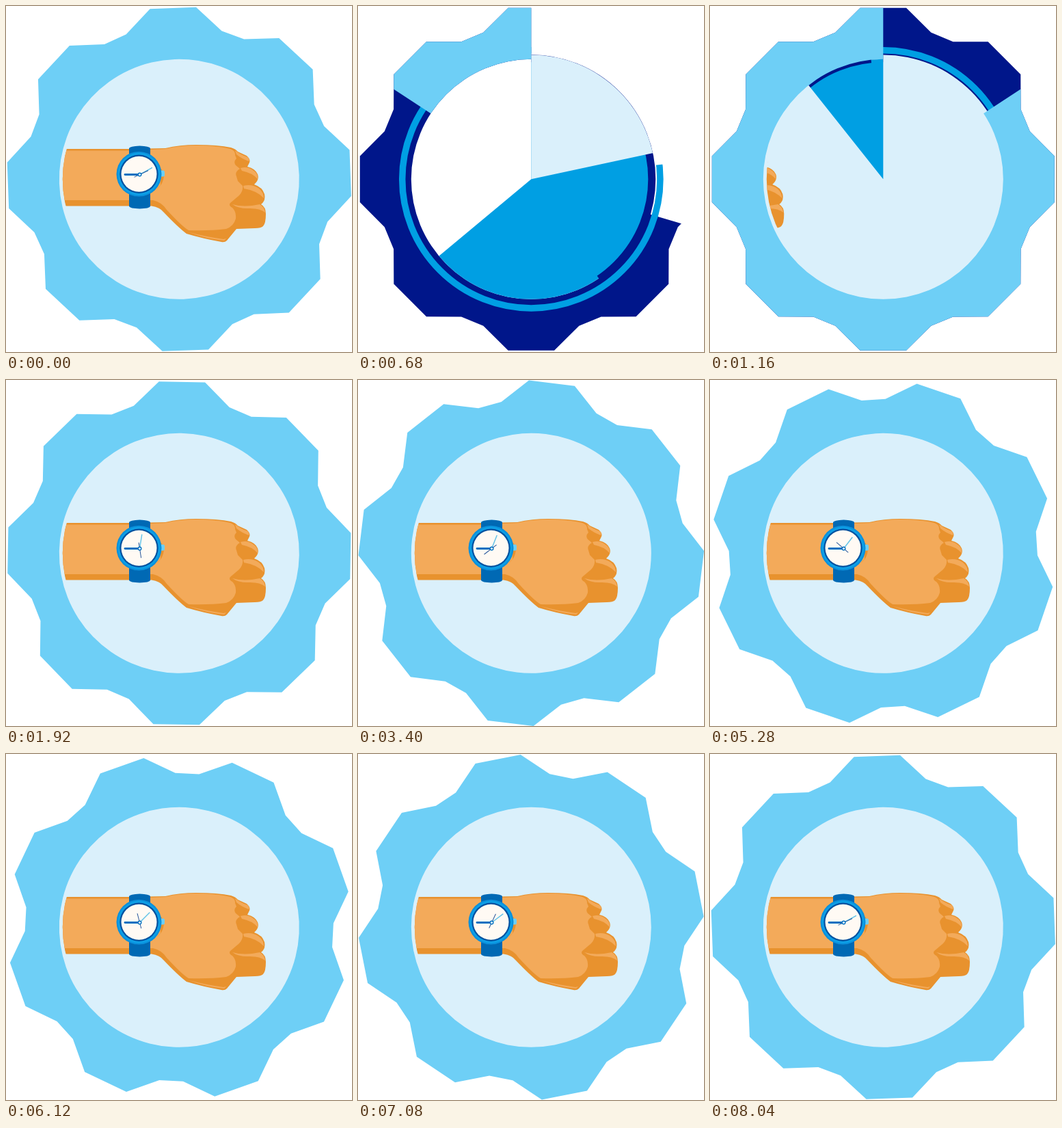
Animation of 506x506 px, one loop 8.08 s. Source, as an HTML page with a canvas:

```html
<!DOCTYPE html>
<html lang="en">
<head>
<meta charset="utf-8">
<title>Watch badge</title>
<style>
html, body { margin: 0; width: 100%; height: 100%; overflow: hidden; background: #fff; }
canvas { display: block; width: 506px; height: 506px; }
</style>
</head>
<body>
<canvas id="stage" width="506" height="506"></canvas>
<script>
const ctx = document.getElementById('stage').getContext('2d');
const LOOP = 8080, STEP = 40, WIPE = 1000, C = 253.3, TAU = Math.PI * 2;
const SKY = '#6ecff6', PALE = '#daf0fb', BLUE = '#009fe3', NAVY = '#00168a';
const SKIN = '#f3aa5a', SHADE = '#e8922e', STRAP = '#0069b4';

const clamp = v => Math.min(1, Math.max(0, v));
const ease = p => (1 - Math.cos(Math.PI * clamp(p))) / 2;
const rad = deg => deg * Math.PI / 180;

function layer(draw) {
  ctx.save();
  draw();
  ctx.restore();
}

function disc(x, y, r, color) {
  ctx.fillStyle = color;
  ctx.beginPath();
  ctx.arc(x, y, r, 0, TAU);
  ctx.fill();
}

function ring(r, width, color) {
  ctx.strokeStyle = color;
  ctx.lineWidth = width;
  ctx.beginPath();
  ctx.arc(0, 0, r, 0, TAU);
  ctx.stroke();
}

function shape(d, color) {
  ctx.fillStyle = color;
  ctx.fill(new Path2D(d));
}

// Radial reveal from twelve o'clock; dir 1 is clockwise, -1 the other way.
function wipe(t, start, dir, draw) {
  const p = ease((t - start) / WIPE);
  if (p <= 0) return;
  layer(() => {
    ctx.translate(C, C);
    if (p < 1) {
      const top = -Math.PI / 2;
      ctx.beginPath();
      ctx.moveTo(0, 0);
      ctx.arc(0, 0, 400, top, top + dir * p * TAU, dir < 0);
      ctx.closePath();
      ctx.clip();
    }
    draw();
  });
}

function gear(color, turn) {
  ctx.rotate(rad(turn));
  ctx.beginPath();
  for (let i = 0; i < 8; i++) {
    const a = i * TAU / 8, c = Math.cos(a), s = Math.sin(a);
    for (const [x, y] of [[-70, -214.5], [-33.7, -250.5], [33.7, -250.5], [70, -214.5]])
      ctx.lineTo(x * c - y * s, x * s + y * c);
  }
  ctx.closePath();
  ctx.moveTo(175.5, 0);
  ctx.arc(0, 0, 175.5, 0, TAU);
  ctx.fillStyle = color;
  ctx.fill('evenodd');
}

function hand(deg, from, to, width, color) {
  layer(() => {
    ctx.translate(195.5, 246.5);
    ctx.rotate(rad(deg));
    ctx.strokeStyle = color;
    ctx.lineWidth = width;
    ctx.lineCap = 'round';
    ctx.beginPath();
    ctx.moveTo(0, -from);
    ctx.lineTo(0, -to);
    ctx.stroke();
  });
}

function arm() {
  // silhouette in the shaded tone
  shape(`M60 209H180L233 208Q254 203 278 203Q310 203 329 207Q336 209 339 213L352 219Q358 224 356 229
    L353 235Q365 238 368 246Q371 254 363 261Q375 265 378 275Q380 285 373 290Q380 294 380 304
    Q380 318 376 322Q373 325 364 325L337 326L323 343Q320 346 315 345Q287 340 264 333
    Q252 324 231 302Q225 294 213 292.5H60Z`, SHADE);
  // lit forearm and back of the hand
  shape(`M60 211.5H180L233 209Q254 204 278 204Q308 204 328 209Q336 212 335 218L337 223
    Q332 228 336 233L342 238Q334 243 337 249L339 256L346 263Q347 271 341 277L328 288Q325 292 331 295
    Q337 301 336 311Q333 322 322 326Q298 329 267 328Q258 323 235 298Q228 287 215 284H60Z`, SKIN);
  // lit tops of the fingers and thumb
  shape('M335 211Q342 217 353 221Q357 224 355 227Q344 223 337 217Z', SKIN);
  shape('M343 237Q353 234 361 240Q369 245 368 253Q360 244 345 241Z', SKIN);
  shape('M347 263Q360 260 370 267Q377 273 377 281Q367 270 348 267Z', SKIN);
  shape('M331 290Q348 295 371 290Q378 294 379 302Q371 295 353 296Q339 296 331 290Z', SKIN);
  shape('M268 331Q290 337 318 341L322 340L319 343Q291 340 268 331Z', SKIN);
}

function watch(t) {
  shape('M220 268Q232 260 231 242L226 238V262Z', SHADE);
  shape('M180 208Q181 205 195.5 204.5Q210 205 211 208V293Q210 296 195.5 296.5Q181 296 180 293Z', STRAP);
  shape('M180 217Q195 208 211 217V222H180ZM180 271H211V275Q195 283 180 275Z', '#00559f');
  ctx.fillStyle = SKY;
  ctx.beginPath();
  ctx.roundRect(224, 240.5, 8, 9, 2.5);
  ctx.fill();
  disc(194.5, 245.8, 33, '#0a8fdb');
  disc(194.5, 245.8, 31, '#0c9fe6');
  disc(194.5, 245.8, 28.2, '#00509f');
  disc(194.5, 245.8, 26, '#fffaf4');

  hand(9 + .0085 * (t - 1920), 0, 20.5, 1.5, '#65c3e8');
  hand(171 + .0415 * (t - 1920), -8.5, 13.5, 1, '#28569b');
  hand(270, 0, 21.5, 2.8, '#006fc0');
  disc(195.5, 246.5, 3, '#006fc0');
  disc(195.5, 246.5, 1.6, '#fff');
}

function paint(t) {
  ctx.fillStyle = '#fff';
  ctx.fillRect(0, 0, 506, 506);

  const covered = t >= 420 + WIPE;
  if (!covered) {
    wipe(t, 46, -1, () => gear(NAVY, 0));
    wipe(t, 0, -1, () => ring(188.6, 9.5, BLUE));
    wipe(t, 90, 1, () => disc(0, 0, 175.5, BLUE));
    wipe(t, 241, 1, () => ring(176.5, 11, NAVY));
  }
  wipe(t, 372, 1, () => disc(0, 0, 181.8, PALE));

  const slide = ease((t - 1000) / 700);
  if (slide > 0) layer(() => {
    ctx.beginPath();
    ctx.arc(C, C, 170.5, 0, TAU);
    ctx.clip();
    ctx.translate(-310 * (1 - slide), 0);
    arm();
    watch(t);
  });

  const turn = 25.48 * Math.pow(Math.max(0, t - 1360) / 4760, 1.54);
  wipe(t, 420, -1, () => gear(SKY, turn));
}

const begin = performance.now();
function tick() {
  const t = Math.floor((performance.now() - begin) % LOOP / STEP) * STEP;
  // the loop opens by holding its closing pose for one step
  paint(t || LOOP - STEP);
  requestAnimationFrame(tick);
}
tick();
</script>
</body>
</html>
```
